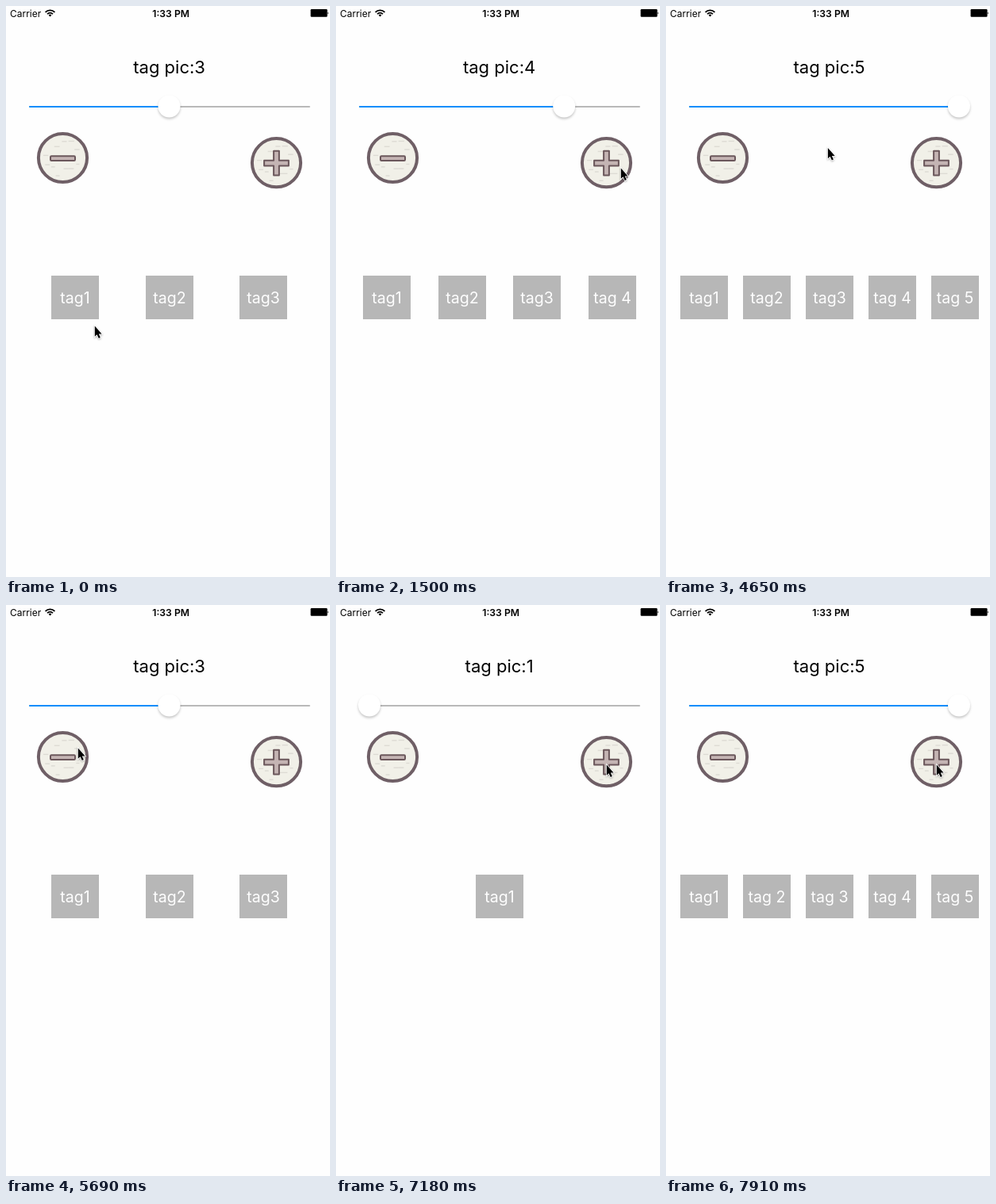
Animation, 408 px wide and 720 px high, one loop 8000 ms. Source, as an HTML page:

```html
<!DOCTYPE html>
<html lang="en">
<head>
<meta charset="utf-8">
<title>Tag counter</title>
<style>
  html, body { margin: 0; width: 100%; height: 100%; overflow: hidden; background: #fefefe; }
  svg { display: block; width: 100%; height: 100%; }
  text { font-family: Inter, Roboto, sans-serif; text-anchor: middle; }
  #cursor { filter: drop-shadow(0 1px .8px rgba(0, 0, 0, .3)); }
  #thumb { filter: drop-shadow(0 2px 1.5px rgba(0, 0, 0, .22)); }
</style>
</head>
<body>
<svg viewBox="0 0 408 720">
  <defs>
    <g id="disc">
      <circle r="30.6" fill="#f1f0e8" stroke="#6f5f66" stroke-width="4"/>
      <g id="dashes" fill="#dddbd4"></g>
    </g>
  </defs>
  <rect width="408" height="720" fill="#fefefe"/>

  <text x="5" y="14" font-size="12" style="text-anchor:start">Carrier</text>
  <g fill="none" stroke="#000" stroke-width="1.8">
    <path d="M49.6 7.8a8.2 8.2 0 0 1 11.8 0M52 10.2a5 5 0 0 1 7 0"/>
    <path d="M53.6 11.5a2.8 2.8 0 0 1 3.8 0L55.5 13.6z" fill="#000" stroke="none"/>
  </g>
  <text x="207.7" y="14" font-size="12.2" font-weight="600">1:33 PM</text>
  <rect x="383.6" y="4" width="21" height="9.8" rx="1.2"/>
  <path d="M405.3 7.2q1.8 1.8 0 3.6z"/>

  <text id="title" x="205.6" y="85" font-size="22"></text>

  <rect x="29" y="126" width="354" height="2" rx="1" fill="#b9b9b9"/>
  <rect id="fill" x="29" y="126" height="2" rx="1" fill="#0a8dfb"/>
  <circle id="thumb" cy="126.5" r="14" fill="#fff"/>

  <g transform="translate(71.5 191.5)">
    <use href="#disc"/>
    <rect x="-15.5" y="-2.3" width="31" height="5.8" rx="1.2" fill="#c4b4b3" stroke="#6b575b" stroke-width="2"/>
  </g>
  <g transform="translate(340.5 197.7)">
    <use href="#disc"/>
    <path d="M-3.4 -15h6.8v12h12v6.8h-12v12h-6.8v-12h-12v-6.8h12z" fill="#c4b4b3"
          stroke="#6b575b" stroke-width="2" stroke-linejoin="round"/>
  </g>

  <g id="tags"></g>
  <path id="cursor" d="M.8 1.6V14.8L3.6 12.2L5.8 17L7.8 16.1L5.8 11.4H9.6Z" fill="#000"
        stroke="#fff" stroke-width="1.6" paint-order="stroke"/>
</svg>
<script>
const LOOP = 8000;
const STEP = 150;
const MAX_TAGS = 5;
const $ = id => document.getElementById(id);

// button press times; the last run of plus presses is evenly spaced
const minus = [5240, 5690, 5990, 6290];
const plus = [1500, 3150];
for (let i = 0; i < 4; i++) plus.push(7470 + i * 440 / 3);

// each move runs from the previous stop and bows vertically by `bend`
const home = { x: 111, y: 402 };
const moves = [
  { start: 150, steps: 4, x: 247, y: 322, bend: 0 },
  { start: 900, steps: 3, x: 358, y: 203, bend: 0 },
  { start: 4650, steps: 4, x: 90, y: 179, bend: -12 },
  { start: 6730, steps: 4, x: 340, y: 200, bend: 33 }
];

const passed = (times, t) => times.filter(time => time <= t).length;
const easeOut = p => 1 - (1 - p) ** 3;

function pointerAt(t) {
  let { x, y } = home;
  for (const m of moves) {
    if (t < m.start) break;
    const step = Math.floor((t - m.start) / STEP) + 1;
    const p = easeOut(Math.min(1, step / m.steps));
    x += (m.x - x) * p;
    y += (m.y - y) * p + m.bend * Math.sin(Math.PI * p);
  }
  return { x, y };
}

// boxes spread evenly around the middle, snapped to whole pixels
function tagX(i, count) {
  const pitch = 474 / (count + 1);
  return Math.ceil(176 + (i - (count - 1) / 2) * pitch - 0.5);
}

function make(name, attrs, parent) {
  const el = document.createElementNS("http://www.w3.org/2000/svg", name);
  for (const key in attrs) el.setAttribute(key, attrs[key]);
  return parent.appendChild(el);
}

let seed = 7;
const random = () => (seed = seed * 16807 % 2147483647) / 2147483647;
for (let i = 0; i < 12; i++) {
  const angle = i * 2.4;
  const r = 12 + 13 * random();
  make("rect", {
    x: r * Math.cos(angle) - 3, y: r * Math.sin(angle),
    width: 4 + 4 * random(), height: 1.4
  }, $("dashes"));
}

const tags = Array.from({ length: MAX_TAGS }, () => {
  const group = make("g", {}, $("tags"));
  make("rect", { y: 340, width: 60, height: 55, fill: "#b7b7b7" }, group);
  const label = make("text", { x: 30, y: 374.5, "font-size": 19.5, fill: "#fefefe" }, group);
  return { group, label };
});

function draw(t) {
  const removed = passed(minus, t);
  const count = 3 + passed(plus, t) - removed;
  const thumb = 42 + (count - 1) * 81.75;
  const { x, y } = pointerAt(t);

  $("title").textContent = "tag pic:" + count;
  $("thumb").setAttribute("cx", thumb);
  $("fill").setAttribute("width", thumb - 29);
  $("cursor").setAttribute("transform", `translate(${x} ${y})`);

  // tags added by the plus button carry a space
  const preset = Math.min(3, MAX_TAGS - removed);
  tags.forEach(({ group, label }, i) => {
    group.setAttribute("visibility", i < count ? "visible" : "hidden");
    group.setAttribute("transform", `translate(${tagX(i, count)} 0)`);
    label.textContent = (i < preset ? "tag" : "tag ") + (i + 1);
  });
}

const start = performance.now();
function tick() {
  draw((performance.now() - start) % LOOP);
  requestAnimationFrame(tick);
}
tick();
</script>
</body>
</html>
```
